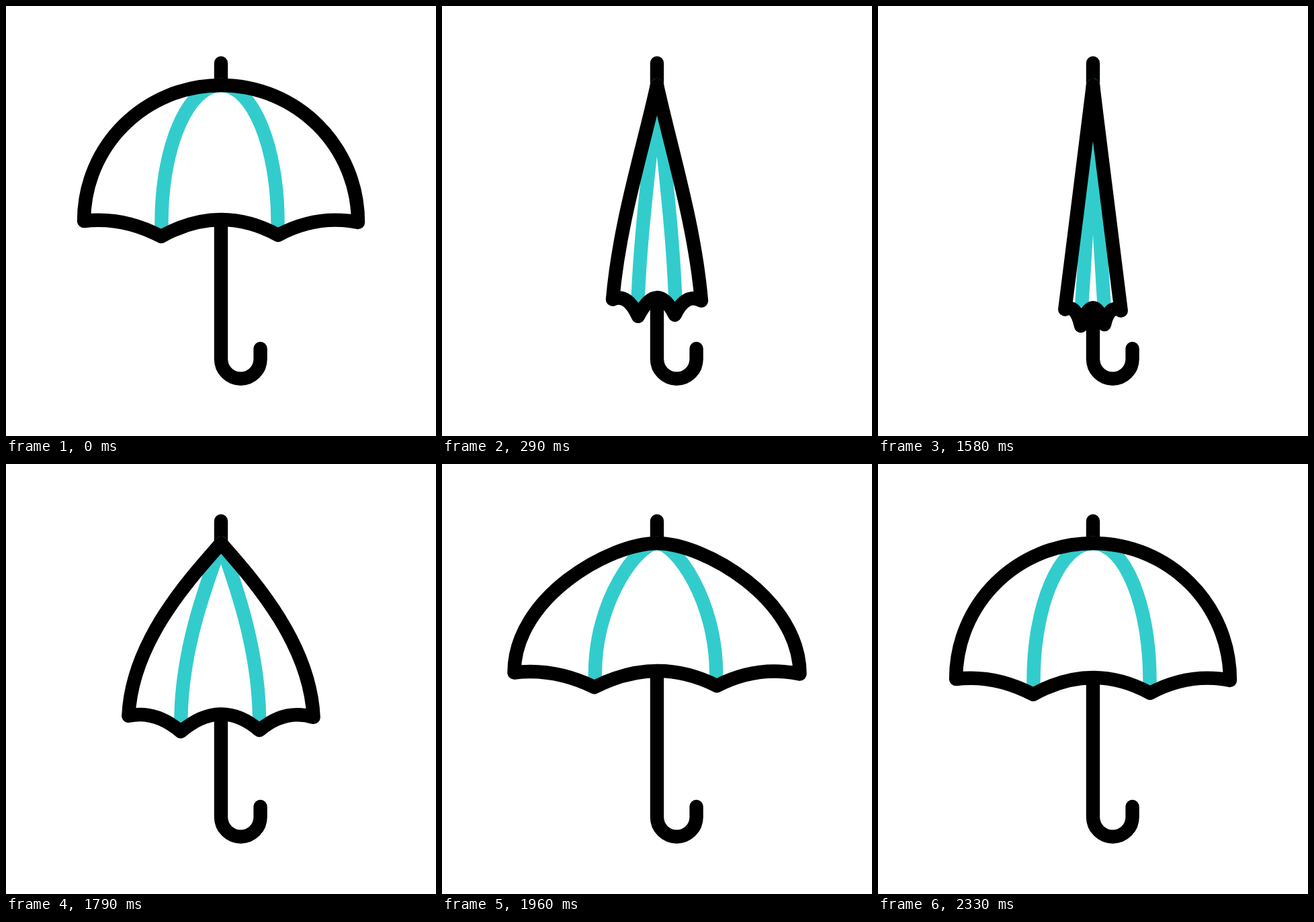
Animation of 640x640 px, one loop 3000 ms. Source, as an HTML page without scripts:

```html
<!DOCTYPE html>
<html lang="en">
<head>
<meta charset="utf-8">
<title>Umbrella</title>
<style>
html, body { margin: 0; width: 100%; height: 100%; overflow: hidden; background: #fff; }
svg { display: block; width: 100%; height: 100%; }
path { fill: none; stroke: #000; stroke-width: 20.4; stroke-linecap: round; stroke-linejoin: round; }

.canopy {
  --open: path("M116 320C116 208 207 118 320 118C433 118 524 209 524 322Q463 310 405 341Q319 294 231 343Q174 313 116 320Z");
  --wide: path("M106.5 309.5C106.5 198 254 118 320 118C386 118 533.5 200 533.5 311.5Q470 298 409.5 329Q320 284 226.5 331Q166 302 106.5 309.5Z");
  --tight: path("M283.5 462C295.5 347 308 233 320 118C332 233 344.5 349 356.5 464Q341 452 334 486Q320 432 305 488Q298 452 283.5 462Z");
  --shut: path("M273 441C288.5 333 305 227 320 118C335 227 351.5 335 367 443Q348 434 340 462Q320 415 299 464Q291 434 273 441Z");
}
.ribs {
  --open: path("M231 340L231.5 322C231.5 209.5 271 118 320 118C367 118 404.5 209.5 404.5 322L405 338");
  --wide: path("M226.5 328L227.5 310C227.5 203 294 118 320 118C346 118 408.5 203 408.5 310L409.5 326");
  --tight: path("M305 482L304.5 460C310 347 316 233 320 118C324 233 330 347 335 460L334 480");
  --shut: path("M299.5 458L301.5 437C311 330 316 225 320 118C324 225 329 330 338.5 437L340 456");
  stroke: #3cc;
  stroke-linecap: butt;
}
.canopy, .ribs { d: var(--open); animation: fold 3s -4ms infinite; }
.cloth { fill: #fff; stroke: none; }

/* 72 ticks per loop */
@keyframes fold {
  0% { d: var(--open); animation-timing-function: steps(2); }
  2.7778% { d: var(--wide); animation-timing-function: steps(6); }
  11.1111% { d: var(--tight); animation-timing-function: steps(4); }
  16.6667% { d: var(--shut); }
  51.3889% { d: var(--shut); animation-timing-function: steps(2); }
  54.1667% { d: var(--tight); animation-timing-function: steps(7); }
  63.8889% { d: var(--wide); animation-timing-function: steps(10); }
  77.7778%, 100% { d: var(--open); }
}
</style>
</head>
<body>
<svg viewBox="0 0 640 640">
  <path d="M320 85V525.4a29.3 29.3 0 0 0 58.6 0V510"/>
  <path class="canopy cloth"/>
  <path class="ribs"/>
  <path class="canopy"/>
</svg>
</body>
</html>
```
